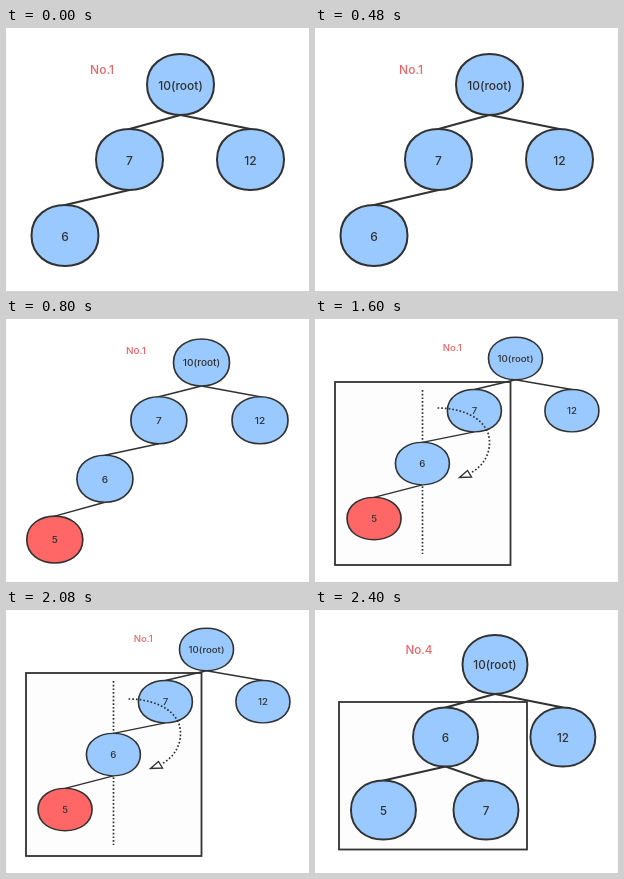
Animation, 303 px wide and 263 px high, one loop 3.2 s. Source, as an HTML page:

```html
<!DOCTYPE html>
<html lang="en">
<head>
<meta charset="utf-8">
<title>Binary tree rotation</title>
<style>
  html, body { margin: 0; width: 100%; height: 100%; overflow: hidden; background: #fff; }
  svg { display: block; width: 303px; height: 263px; }
  text { font: 500 12px Inter, sans-serif; text-anchor: middle; fill: #323232; stroke: none; }
  .label { fill: #ee6569; }
  .scene { fill: none; stroke: #323232; stroke-width: 2; }
  .dots { stroke-width: 1.7; stroke-dasharray: 1.7 2; }
</style>
</head>
<body>
<svg id="stage" viewBox="0 0 303 263"></svg>
<script>
const STEP = 800, RX = 33.5, RY = 30.5;
const BLUE = '#99c9ff', RED = '#ff6666';

// Node positions are relative to the root: [text, x, y, parent index, fill]
const root = ['10(root)', 0, 0];
const right = ['12', 70, 75, 0];
const chain = [root, right, ['7', -51, 75, 0], ['6', -115.5, 151, 2]];
const unbalanced = [...chain, ['5', -175.5, 230, 3, RED]];
const rotated = [root, right, ['6', -51, 75, 0], ['5', -115, 150.5, 2], ['7', -9.3, 150.5, 2]];

const rotationHint = `
  <path class="dots" d="M122.500 89C146 89 167 98 173 114C178 130 170 146 157 153"/>
  <path d="M144.500 158.500L152.500 151.500L156.500 158Z" fill="#fff" stroke-width="1.4"/>`;

const scenes = [
  { at: [174.5, 56.5], scale: [1, 1], nodes: chain, label: 'No.1' },
  { at: [195.5, 43.5], scale: [.836, .77], nodes: unbalanced, label: 'No.1' },
  { at: [200.5, 39.5], scale: [.806, .696], nodes: unbalanced, label: 'No.1',
    box: [20, 63, 175.5, 183],
    back: '<path class="dots" d="M107.500 71V235"/>', front: rotationHint },
  { at: [180, 54.5], scale: [.97, .967], nodes: rotated, label: 'No.4',
    box: [24, 92, 188, 147.5] },
];

function drawNode([text, x, y, , fill = BLUE]) {
  const l = x - RX, r = x + RX, k = RY * 4 / 3;
  return `<path fill="${fill}" d="M${l} ${y}C${l} ${y - k} ${r} ${y - k} ${r} ${y}
    C${r} ${y + k} ${l} ${y + k} ${l} ${y}Z"/>
    <text x="${x}" y="${y + 5}">${text}</text>`;
}

function drawEdge([, x, y, parent], nodes) {
  if (parent === undefined) return '';
  const [, px, py] = nodes[parent];
  return `<path d="M${px} ${py + RY}L${x} ${y - RY}"/>`;
}

function drawBox([x, y, w, h]) {
  return `<rect x="${x}" y="${y}" width="${w}" height="${h}" fill="#fdfdfd" stroke-width="1.8"/>`;
}

function drawScene({ at, scale, nodes, label, box, back = '', front = '' }) {
  return `<g class="scene">${box ? drawBox(box) : ''}${back}
    <g transform="translate(${at}) scale(${scale})">
      ${nodes.map(n => drawEdge(n, nodes)).join('')}
      ${nodes.map(drawNode).join('')}
      <text class="label" x="-78.5" y="-10.5">${label}</text>
    </g>${front}</g>`;
}

const stage = document.getElementById('stage');
stage.innerHTML = scenes.map(drawScene).join('');
const groups = [...stage.children];

function render(now) {
  const current = Math.floor(now / STEP) % scenes.length;
  groups.forEach((g, i) => g.style.display = i === current ? '' : 'none');
}

const start = performance.now();
function tick() {
  render(performance.now() - start);
  requestAnimationFrame(tick);
}
tick();
</script>
</body>
</html>
```
